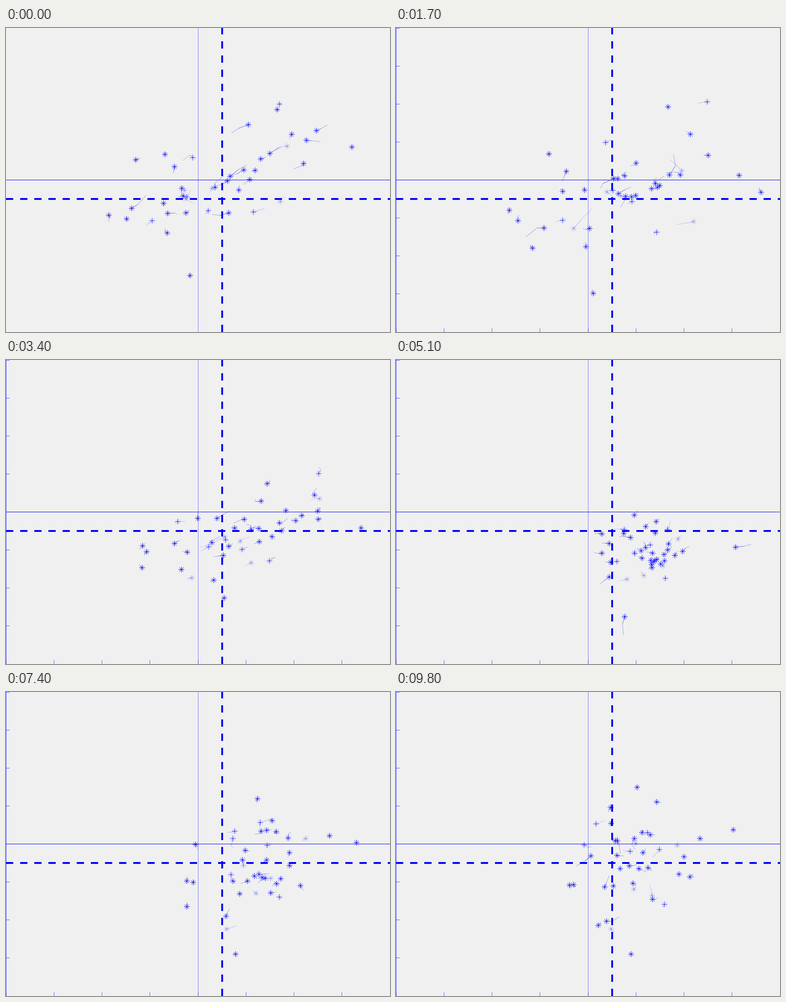
Animation, 842 px wide and 665 px high, one loop 9900 ms. Source, as a matplotlib script:

```python
import matplotlib.pyplot as plt
import numpy as np
from matplotlib.animation import FuncAnimation
from matplotlib.collections import LineCollection

W, H, DPI = 842, 665, 100
PX = 72 / DPI
FRAMES = 99
TAIL = 2
BLUE = "#0000ff"
PALE, LIGHT, STRONG = 5, 6, 30
COUNT = PALE + LIGHT + STRONG
rng = np.random.default_rng(11)
times = np.arange(-TAIL, FRAMES)

# The swarm as a drifting cloud: time, centre, spread and correlation.
CLOUD = [(0, 465, 328, 115, 70, -0.65),
         (17, 500, 347, 120, 72, -0.55),
         (34, 518, 378, 105, 52, -0.65),
         (51, 548, 418, 46, 33, 0.0),
         (64, 557, 385, 74, 54, -0.35),
         (85, 548, 364, 75, 72, -0.3),
         (98, 523, 362, 68, 75, -0.25)]

# The outermost stars on each side: time, x, y.
TOP = [(0, 594, 178), (17, 601, 172), (34, 574, 272), (51, 523, 338),
       (64, 543, 266), (85, 560, 198), (98, 528, 206)]
LEFT = [(0, 264, 420), (17, 298, 481), (34, 305, 419), (51, 466, 398),
        (64, 417, 400), (85, 403, 431), (98, 390, 424)]
RIGHT = [(0, 757, 261), (17, 799, 359), (34, 778, 368), (46, 836, 395),
         (51, 743, 410), (56, 836, 380), (64, 757, 342), (85, 780, 313),
         (98, 741, 299)]
LOW = [(0, 402, 542), (17, 432, 577), (34, 479, 518), (46, 496, 658),
       (51, 499, 560), (56, 490, 658), (64, 480, 570), (85, 531, 572),
       (98, 515, 573)]


def track(keys):
    """Every column of the keys, interpolated over all times."""
    t, *columns = np.array(keys, float).T
    return np.array([np.interp(times, t, c) for c in columns])


def drift(keep=0.995):
    """Slow random motion with unit variance and now and then a big step."""
    steps = np.clip(rng.standard_t(3, (len(times), COUNT, 2)), -5, 5) / 1.6
    z = [rng.normal(size=(COUNT, 2))]
    for before, now in zip(steps, steps[1:]):
        z.append(keep * z[-1] + np.sqrt(1 - keep ** 2) * (before + now) / 1.4)
    z = np.array(z)
    z = (z - z.mean(axis=1, keepdims=True)) / z.std(axis=1, keepdims=True)
    return np.clip(z, -2.1, 2.1)


def build_paths():
    """Star positions with the axes time, star, coordinate."""
    z = drift()
    cx, cy, sx, sy, corr = track(CLOUD)[:, :, None]
    u, v = z[..., 0], z[..., 1]
    x = cx + sx * u
    y = cy + sy * (corr * u + np.sqrt(1 - corr ** 2) * v)
    paths = np.stack([x, y], axis=-1)
    for star, keys in enumerate((TOP, LEFT, RIGHT, LOW), COUNT - 4):
        paths[:, star] = track(keys).T + rng.normal(0, 1.5, (len(times), 2))
    return paths


paths = build_paths()


def tint(*alphas):
    """Blue per star, darker for those that start on the left."""
    rgba = np.zeros((COUNT, 4))
    rgba[:, 2] = np.clip(0.8 + (paths[TAIL, :, 0] - 270) / 1000, 0.8, 1)
    rgba[:PALE + LIGHT, 2] = 1
    rgba[:, 3] = np.repeat(alphas, (PALE, LIGHT, STRONG))
    return rgba


plus_tint = tint(0.25, 0.7, 0.85)
cross_tint = tint(0.25, 0.25, 0.65)
near_tint = tint(0.25, 0.35, 0.6)
far_tint = tint(0.2, 0.25, 0.35)

fig = plt.figure(figsize=(W / DPI, H / DPI), dpi=DPI, facecolor="#f0f0f0")
ax = fig.add_axes([0, 0, 1, 1])
ax.set_xlim(0, W)
ax.set_ylim(H, 0)
ax.axis("off")


def line(x, y, width=1, **style):
    ax.plot(x, y, color=BLUE, lw=width * PX, snap=False, **style)


line([W / 2 + 0.5] * 2, [0, H], alpha=0.5)
line([0, W], [H / 2] * 2)
dash = dict(width=4, ls=(0, (4, 3.765)), dash_capstyle="butt",
            antialiased=False)
line([round(W * 0.5625)] * 2, [H, 0], **dash)
line([0, W], [round(H * 0.5625)] * 2, **dash)

ticks = [[(0.5, 0), (0.5, H)]]
for k in range(8):
    x, y = W * k // 8 + 0.5, H * k // 8 + 0.5
    ticks += [[(0, y), (8, y)], [(x, H - 8), (x, H)]]
frame_lines = LineCollection(ticks, colors=BLUE, linewidths=PX, alpha=0.65,
                             snap=False)
ax.add_collection(frame_lines)

trails = LineCollection([], linewidths=0.9 * PX, snap=False, zorder=3,
                        colors=np.concatenate([far_tint, near_tint]))
stars = LineCollection([], linewidths=PX, snap=False, zorder=4,
                       colors=np.concatenate([cross_tint] * 2 + [plus_tint] * 2))
ax.add_collection(trails)
ax.add_collection(stars)
ARMS = np.array([(4.5, 4.5), (4.5, -4.5), (6.5, 0), (0, 6.5)])


def update(i):
    tail = paths[i:i + TAIL + 1].swapaxes(0, 1)
    trails.set_segments(np.concatenate([tail[:, :2], tail[:, 1:]]) + 0.5)
    centre = np.floor(tail[:, -1] + 0.5) + 0.5
    stars.set_segments(np.concatenate(
        [np.stack([centre - arm, centre + arm], axis=1) for arm in ARMS]))
    frame_lines.set_visible(i > 0)
    return trails, stars, frame_lines


anim = FuncAnimation(fig, update, frames=FRAMES, interval=100,
                     repeat=True, repeat_delay=0, blit=False)
plt.show()
```
